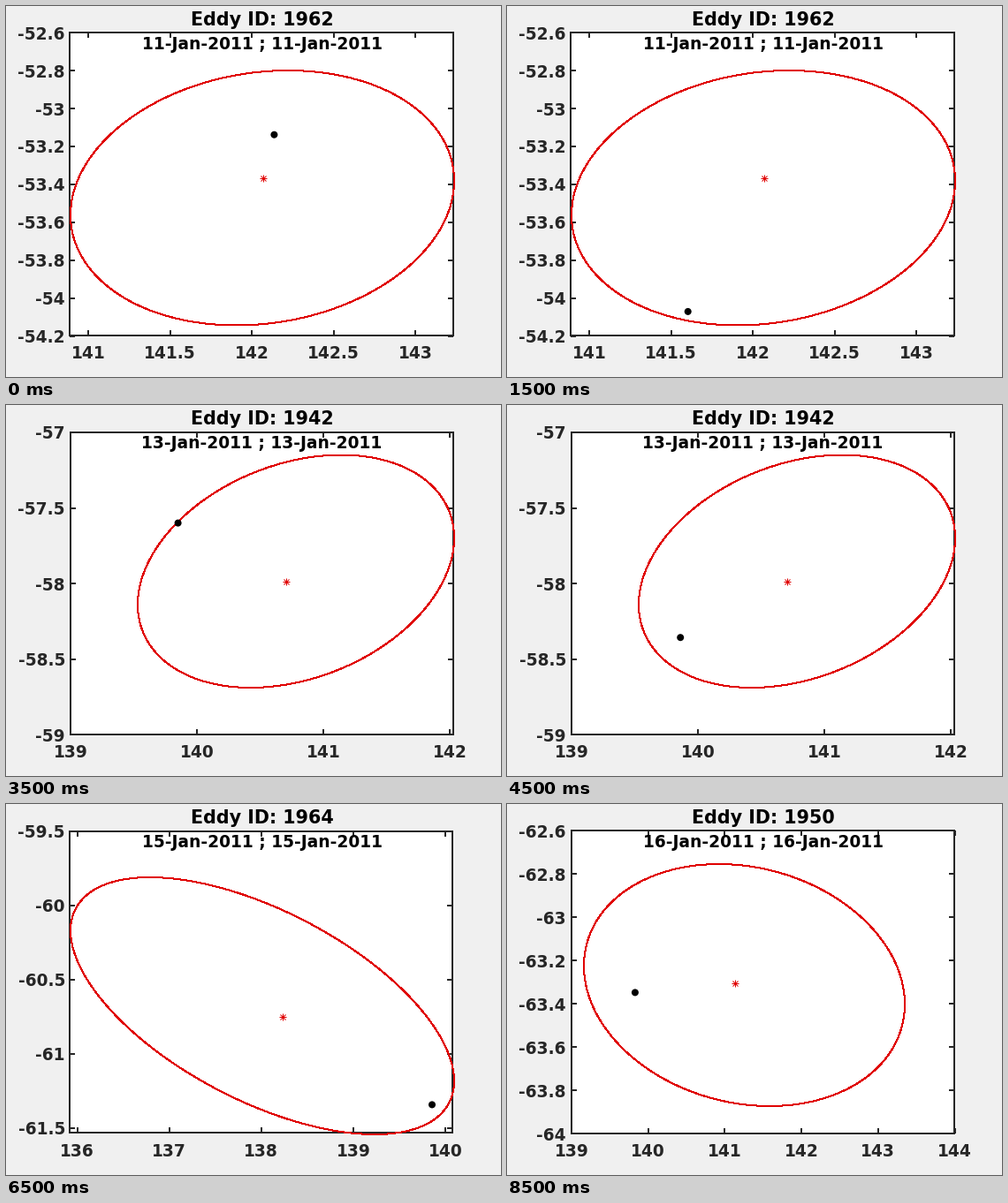
A matplotlib script that plays this animation: 560 px wide and 420 px high, repeating every 9500 ms.

```python
import numpy as np
import matplotlib.pyplot as plt
from matplotlib.animation import FuncAnimation
from matplotlib.patches import Circle, Rectangle

WIDTH, HEIGHT, DPI = 560, 420, 100
PX = 72 / DPI  # points per pixel
TICK = 6
INK, RED = "#262626", "#e00000"

# box: left, right, top, bottom in pixels
# xticks, yticks: first value, value step, count, first pixel, pixel step
# ellipse: centre x, centre y, half width, half height, tilt
SCENES = [
    dict(eddy=1962, day=11, box=(72, 506, 30, 373),
         xticks=(141, 0.5, 5, 93, 92.5), yticks=(-52.6, -0.2, 9, 30.3, 42.9),
         ellipse=(290, 217.25, 217, 144.25, 0.135), centre=(291.5, 195.5)),
    dict(eddy=1939, day=12, box=(73, 505, 30, 372),
         xticks=(141, 0.5, 5, 126, 90.75), yticks=(-54.6, -0.2, 6, 30.3, 68.5),
         ellipse=(290, 199.75, 217, 139.25, 0.01), centre=(290.5, 201.5)),
    dict(eddy=1942, day=13, box=(73, 506, 31, 373),
         xticks=(139, 1, 4, 73, 143), yticks=(-57, -0.5, 5, 31, 85.6),
         ellipse=(328, 188.25, 179, 131.75, 0.286), centre=(317.5, 200.5)),
    dict(eddy=1964, day=15, box=(72, 505, 31, 372),
         xticks=(136, 1, 5, 80.6, 104.1), yticks=(-59.5, -0.5, 5, 31, 84),
         ellipse=(290, 228.5, 217, 145.5, -0.585), centre=(313.5, 241.5)),
    dict(eddy=1950, day=16, box=(73, 506, 30, 373),
         xticks=(139, 1, 6, 73, 86.7), yticks=(-62.6, -0.2, 8, 30.3, 49),
         ellipse=(268.5, 205, 181.5, 137, -0.158), centre=(258.5, 203.5)),
]

# scene index and position of the moving dot
SHOTS = [
    (0, 303.4, 145.7), (0, 256.8, 241.2), (0, 204.7, 345.9),
    (1, 129.4, 174.8),
    (2, 194.6, 133.6), (2, 196.2, 263.2),
    (3, 479.8, 257.8), (3, 482, 340.4),
    (4, 147.2, 91.8), (4, 144.9, 213.4),
]

fig = plt.figure(figsize=(WIDTH / DPI, HEIGHT / DPI), dpi=DPI, facecolor="#f0f0f0")
ax = fig.add_axes([0, 0, 1, 1])


def label(x, y, text, size=18.67, color=INK, ha="center"):
    ax.text(x, y, text, fontsize=size * PX, color=color, ha=ha, va="baseline",
            family="DejaVu Sans", weight="bold")


def line(xs, ys, color=INK, width=2, **style):
    ax.plot(xs, ys, color=color, lw=width * PX, solid_capstyle="butt", **style)


def tick_marks(first, step, count, start, spacing):
    for i in range(count):
        yield start + i * spacing, f"{round(first + i * step, 1):g}"


def draw_axes(scene):
    left, right, top, bottom = scene["box"]
    ax.add_patch(Rectangle((left, top), right - left, bottom - top,
                           fc="white", ec=INK, lw=2 * PX))
    for x, text in tick_marks(*scene["xticks"]):
        line([x, x], [bottom, bottom - TICK])
        line([x, x], [top, top + TICK])
        label(x, 399, text)
    for y, text in tick_marks(*scene["yticks"]):
        line([left, left + TICK], [y, y])
        line([right, right - TICK], [y, y])
        label(67, y + 7.5, text, ha="right")


def draw_ellipse(cx, cy, half_w, half_h, tilt):
    t = np.linspace(0, 2 * np.pi, 241)
    x = cx + half_w * np.cos(t)
    y = cy - half_h * np.sin(t + np.arcsin(tilt))
    line(x, y, RED, 1, antialiased=False)  # aliased strokes come out 2 px wide


def draw_asterisk(x, y):
    for dx, dy in [(4, 0), (0, 4), (3, 3), (3, -3)]:
        line([x - dx, x + dx], [y - dy, y + dy], RED, 1, snap=False)


def update(frame):
    index, x, y = SHOTS[(frame + 1) // 2]
    scene = SCENES[index]
    ax.clear()
    ax.set_axis_off()
    draw_axes(scene)
    draw_ellipse(*scene["ellipse"])
    draw_asterisk(*scene["centre"])
    ax.add_patch(Circle((x, y), 4, color="black", lw=0, zorder=3))
    date = f"{scene['day']}-Jan-2011"
    label(289.5, 22, f"Eddy ID: {scene['eddy']}", 20.6, "black")
    label(289.5, 49, f"{date} ; {date}", color="black")
    ax.set_xlim(0, WIDTH)
    ax.set_ylim(HEIGHT, 0)
    return []


anim = FuncAnimation(fig, update, frames=19, interval=500, repeat=True,
                     repeat_delay=0, init_func=lambda: [])
plt.show()
```
